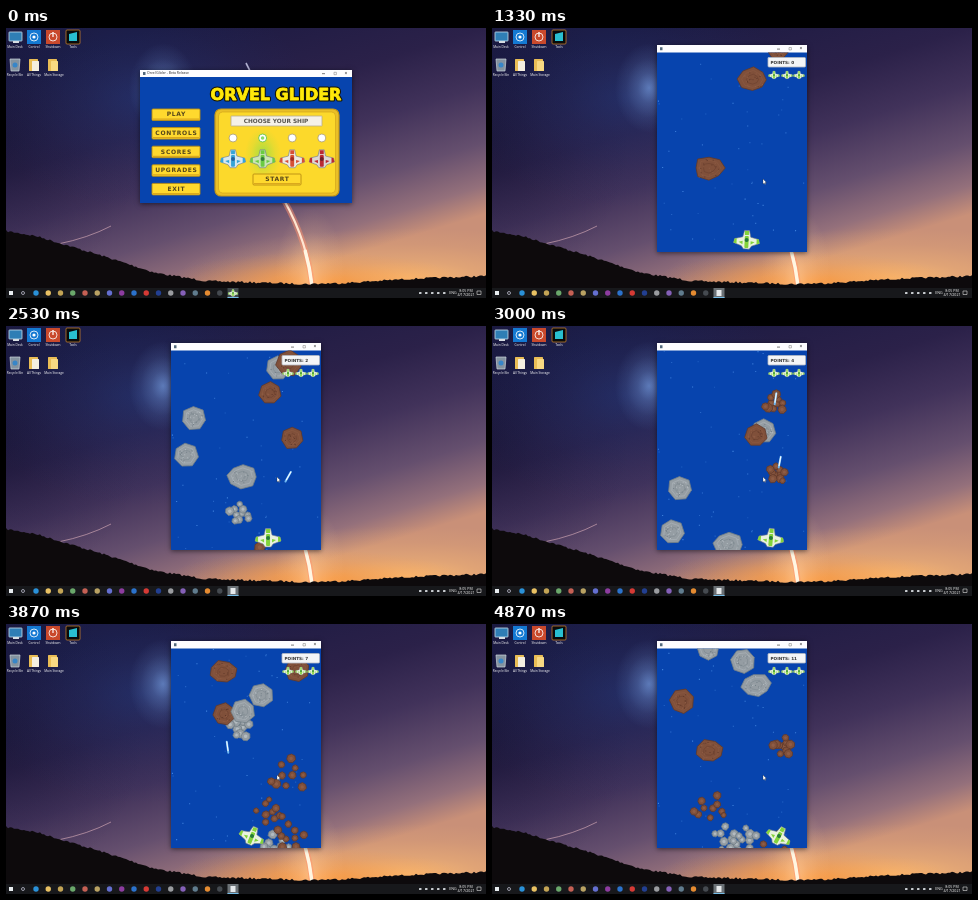
An HTML page with a canvas for the animation above (4.94 s loop, 480 by 270 pixels).

```html
<!DOCTYPE html>
<html lang="en">
<head>
<meta charset="utf-8">
<title>Space shooter on a desktop</title>
<style>
html, body { margin: 0; width: 100%; height: 100%; overflow: hidden; background: #000; }
canvas { display: block; width: 480px; height: 270px; }
</style>
</head>
<body>
<canvas id="stage" width="480" height="270"></canvas>
<script>
const canvas = document.getElementById('stage');
let c = canvas.getContext('2d');
const LOOP = 4940, GAME_START = 600, TAU = Math.PI * 2;
const WIDE = '"DejaVu Sans", sans-serif', SANS = '"Open Sans", sans-serif';

function random(seed) {
  return () => {
    seed = (seed * 16807) % 2147483647;
    return seed / 2147483647;
  };
}

function rect(x, y, w, h, fill, radius = 0, stroke, line = 1) {
  c.beginPath();
  c.roundRect(x, y, w, h, radius);
  c.fillStyle = fill;
  c.fill();
  if (stroke) { c.strokeStyle = stroke; c.lineWidth = line; c.stroke(); }
}

function disc(x, y, r, fill, stroke) {
  c.beginPath();
  c.arc(x, y, r, 0, TAU);
  c.fillStyle = fill;
  c.fill();
  if (stroke) { c.strokeStyle = stroke; c.lineWidth = 0.8; c.stroke(); }
}

function poly(points, fill, stroke, line = 0.7) {
  c.beginPath();
  points.forEach(([x, y]) => c.lineTo(x, y));
  c.closePath();
  if (fill) { c.fillStyle = fill; c.fill(); }
  if (stroke) { c.strokeStyle = stroke; c.lineWidth = line; c.stroke(); }
}

function text(s, x, y, font, fill, align = 'center', spacing = 0) {
  c.font = font;
  c.textAlign = align;
  c.textBaseline = 'middle';
  c.letterSpacing = spacing + 'px';
  c.fillStyle = fill;
  c.fillText(s, x, y);
  c.letterSpacing = '0px';
}

function at(x, y, angle, draw) {
  c.save();
  c.translate(x, y);
  c.rotate(angle);
  draw();
  c.restore();
}

// Desktop

function glow(x, y, rx, ry, color, alpha) {
  c.save();
  c.translate(x, y);
  c.scale(rx, ry);
  const g = c.createRadialGradient(0, 0, 0, 0, 0, 1);
  [1, 0.5, 0.18, 0].forEach((a, i) => g.addColorStop(i / 3, `rgba(${color},${a * alpha})`));
  c.fillStyle = g;
  c.fillRect(-1, -1, 2, 2);
  c.restore();
}

function curve(x0, y0, cx, cy, x1, y1, color, width) {
  c.beginPath();
  c.moveTo(x0, y0);
  c.quadraticCurveTo(cx, cy, x1, y1);
  c.strokeStyle = color;
  c.lineWidth = width;
  c.stroke();
}

function drawSky() {
  // Tilted, because the right side of the sky is the lighter one.
  const sky = c.createLinearGradient(150, 0, 230, 262);
  [[0, '#1b1a42'], [0.35, '#2b2149'], [0.55, '#41325a'], [0.75, '#654f6e'],
   [0.9, '#94707b'], [1, '#c99078']].forEach(s => sky.addColorStop(...s));
  rect(0, 0, 480, 270, sky);
  glow(0, 110, 140, 150, '20,18,48', 0.5);
  glow(135, 70, 170, 110, '35,55,120', 0.6);
  glow(157, 60, 34, 45, '130,175,245', 0.6);
  glow(400, 250, 230, 50, '255,190,115', 0.85);
  glow(310, 254, 150, 30, '255,150,50', 0.85);
  glow(304, 250, 35, 70, '255,200,150', 0.7);
  curve(240, 35, 248, 50, 254, 68, 'rgba(225,225,255,.75)', 1.6);
  curve(233, 70, 262, 118, 279, 175, 'rgba(245,235,255,.9)', 1.8);
  curve(278, 172, 302, 215, 306, 258, 'rgba(255,145,110,.5)', 6);
  curve(278, 172, 302, 215, 306, 258, '#ffe6d2', 2.2);
  curve(299, 222, 304, 240, 306, 258, '#fff6e2', 3.4);
  curve(52, 216, 82, 210, 105, 198, 'rgba(225,180,190,.75)', 0.8);

  const ridge = [[0, 203], [30, 208], [60, 217], [100, 229], [150, 245], [200, 253],
                 [300, 256], [340, 255], [400, 251], [480, 248]];
  const rnd = random(7), hill = [[0, 270]];
  for (let i = 0, x = 0; x <= 480; x += 2) {
    while (i < ridge.length - 2 && x > ridge[i + 1][0]) i++;
    const [x0, y0] = ridge[i], [x1, y1] = ridge[i + 1];
    hill.push([x, y0 + (y1 - y0) * (x - x0) / (x1 - x0) + rnd() * 2 - 1]);
  }
  poly([...hill, [480, 270]], '#0d0a0c');
}

function drawIcons() {
  const label = (s, x, y) => text(s, x, y, `3.2px ${SANS}`, '#fff');
  rect(3, 4, 13, 9, '#2f7eb5', 0.5, '#c8deea', 0.8);
  rect(7, 13, 6, 2, '#d6dde2');
  rect(21, 2, 14, 14, '#1479d2');
  disc(28, 9, 4, '#1479d2', '#fff');
  disc(28, 9, 1.6, '#fff');
  rect(40, 2, 14, 14, '#c9492c');
  disc(47, 9, 4, '#c9492c', '#fff');
  rect(46.4, 4, 1.2, 5, '#fff');
  rect(60, 2, 14, 14, '#080a0c', 1, '#d88a2c', 0.7);
  poly([[63, 6], [71, 4], [71, 13], [63, 13]], '#29bfd0');
  poly([[4, 31], [14, 31], [13, 43], [5, 43]], '#8493a0', '#ccd5dc');
  disc(9, 37, 2.5, '#3786c8');
  for (const x of [23, 42]) {
    rect(x, 31, 9, 12, '#e9bd55', 0.5);
    rect(x + 3, 33, 7, 10, x < 30 ? '#f4efe0' : '#f8d982', 0.5);
  }
  label('Main Desk', 9, 19.5);
  label('Control', 28, 19.5);
  label('Shutdown', 47, 19.5);
  label('Tools', 67, 19.5);
  label('Recycle Bin', 9, 47);
  label('All Things', 28, 47);
  label('Main Storage', 48, 47);
}

function drawTaskbar() {
  rect(0, 260, 480, 10, '#17181b');
  rect(3, 263, 4, 4, '#e8edf0');
  disc(17, 265, 1.5, '#17181b', '#bbc');
  const colors = ['#2a91d8', '#e9c163', '#c3a455', '#6aa86b', '#c56054', '#b9a263', '#646fd0',
    '#8d3ca0', '#2b72cc', '#d63a35', '#223f91', '#9a9ca0', '#8560b8', '#607c8e', '#e58b31', '#454a50'];
  colors.forEach((color, i) => disc(30 + i * 12.25, 265, 2.7, color));
  [414, 420, 426, 432, 438].forEach(x => rect(x - 1, 264, 2.5, 2, '#c8ccd0', 0.5));
  text('ENG', 447, 265, `3.6px ${SANS}`, '#fff');
  text('8:05 PM', 460, 262.7, `3.6px ${SANS}`, '#fff');
  text('4/17/2021', 460, 267.2, `3.6px ${SANS}`, '#fff');
  rect(471, 263, 4, 3.5, '#17181b', 0, '#ddd', 0.6);
}

function makeDesktop() {
  const layer = document.createElement('canvas'), screen = c;
  layer.width = 480;
  layer.height = 270;
  c = layer.getContext('2d');
  drawSky();
  drawIcons();
  drawTaskbar();
  c = screen;
  return layer;
}

function drawWindow(x, y, w, h, bar, title) {
  c.save();
  c.shadowColor = 'rgba(0,0,0,.55)';
  c.shadowBlur = 5;
  c.shadowOffsetY = 1;
  rect(x, y, w, h, '#0744ae');
  c.restore();
  rect(x, y, w, bar, '#fdfdff');
  const mid = y + bar / 2, right = x + w;
  rect(x + 3, mid - 1.5, 2.5, 3, '#52697c');
  text(title, x + 7, mid, `3.4px ${SANS}`, '#222', 'left');
  rect(right - 30, mid, 3, 0.6, '#222');
  rect(right - 18, mid - 1.2, 2.4, 2.4, '#fff', 0, '#777', 0.5);
  text('×', right - 6, mid, `5px ${SANS}`, '#222');
}

// Ships and menu

function drawShip(x, y, angle, scale, wing, trim, core) {
  at(x, y, angle, () => {
    c.scale(scale, scale);
    poly([[-13, 3], [-12, -1], [-4, -3], [-2.5, -9.5], [2.5, -9.5], [4, -3], [12, -1], [13, 3],
          [5, 6], [3, 9], [-3, 9], [-5, 6]], wing, '#68758a', 0.6);
    for (const side of [-1, 1]) {
      poly([[side * 13, 3], [side * 12, -1], [side * 10, -1.4], [side * 10, 4]], trim);
      poly([[side * 8, 2], [side * 4, 1], [side * 4, 4.5]], trim);
    }
    rect(-2, -9, 4, 4, trim);
    rect(-2, -4, 4, 12, trim, 1);
    disc(0, 0, 2, core);
  });
}

const greenShip = (x, y, angle, scale) =>
  drawShip(x, y, angle, scale, '#e9f2df', '#83d33b', '#267a3a');

function drawButton(label, x, y, w, h) {
  rect(x, y, w, h, '#ffd92e', 1, '#b98d13', 0.9);
  rect(x + 1, y + h - 2, w - 2, 1.3, '#dba91c');
  text(label, x + w / 2 + 0.4, y + h / 2, `bold 6px ${WIDE}`, '#54451a', 'center', 0.7);
}

function drawMenu() {
  drawWindow(134, 42, 212, 133, 7, 'Orvel Glider - Beta Release');
  c.font = `900 16px ${WIDE}`;
  c.textAlign = 'center';
  c.textBaseline = 'middle';
  c.lineJoin = 'round';
  c.lineWidth = 3;
  c.strokeStyle = '#171400';
  c.strokeText('ORVEL GLIDER', 270, 67.5);
  c.fillStyle = c.strokeStyle = '#ffe90a';
  c.lineWidth = 0.8;
  c.fillText('ORVEL GLIDER', 270, 67.5);
  c.strokeText('ORVEL GLIDER', 270, 67.5);

  ['PLAY', 'CONTROLS', 'SCORES', 'UPGRADES', 'EXIT']
    .forEach((label, i) => drawButton(label, 146, 81 + i * 18.6, 48, 11.5));

  rect(209, 81, 124, 87, '#e9bf27', 6, '#c59718', 1.2);
  rect(212.5, 84, 117, 81, '#fcd92b', 4, '#d3a51c', 0.7);
  rect(225, 88, 91, 10, '#f5f1e8', 0.5, '#b8ad8c', 0.8);
  text('CHOOSE YOUR SHIP', 270, 93, `bold 5.8px ${WIDE}`, '#55524c');

  glow(257, 127, 18, 27, '125,225,75', 0.85);
  [['#d9e8f0', '#36a4d8', '#235f9d'], ['#cbe5b5', '#6acb42', '#347b3c'],
   ['#eee9e2', '#d65035', '#a02b24'], ['#ddd8d5', '#b92a32', '#691f2b']]
    .forEach((colors, i) => {
      const x = 227 + i * 29.6;
      disc(x, 110, 4, '#fff', i === 1 ? '#55bd3c' : '#a99b6f');
      if (i === 1) disc(x, 110, 1.8, '#87dc69');
      drawShip(x, 131, 0, 0.97, ...colors);
    });
  drawButton('START', 247, 146, 48, 11);
}

// Game

const shipKeys = [ // time, x, tilt in degrees
  [600, 245, 0], [900, 245, 0], [1570, 260, 4], [1870, 268, 22], [2270, 242, -3],
  [2530, 262, 0], [2830, 278, 0], [3000, 279, 5], [3598, 233, -5], [3870, 246, 22], [4870, 287, 28]];

function shipAt(t) {
  let i = 0;
  while (i < shipKeys.length - 2 && t > shipKeys[i + 1][0]) i++;
  const [t0, x0, a0] = shipKeys[i], [t1, x1, a1] = shipKeys[i + 1];
  const k = Math.max(0, Math.min(1, (t - t0) / (t1 - t0)));
  return { x: x0 + (x1 - x0) * k, angle: (a0 + (a1 - a0) * k) * Math.PI / 180 };
}

// kind (brown/grey), time, x, y at that time, px per second, radius, hit time
const meteors = [
  ['b', 730, 217, 39, 168, 15],
  ['b', 1870, 261, 135, 155, 15, 1810],
  ['g', 1870, 236, 55, 144, 15],
  ['g', 1870, 234, 83, 158, 12, 2400],
  ['g', 2530, 180, 129, 163, 12],
  ['g', 2530, 188, 92, 149, 12],
  ['g', 2530, 272, 42, 134, 12, 3350],
  ['b', 2530, 286, 112, 76, 11, 2970],
  ['b', 2530, 264, 67, 90, 11, 3250],
  ['b', 2530, 283, 37, 85, 13, 2990],
  ['g', 3870, 235, 103, 147, 13, 3780],
  ['b', 3870, 218, 90, 94, 11, 3955],
  ['g', 3870, 237, 87, 128, 12, 4250],
  ['g', 3870, 255, 71, 145, 12, 4400],
  ['b', 3870, 217, 48, 79, 15],
  ['b', 3870, 291, 46, 76, 12, 4800],
  ['b', 4870, 190, 77, 110, 12],
  ['g', 4870, 251, 37, 140, 12],
  ['g', 4870, 264, 61, 140, 15],
  ['g', 4870, 216, 25, 145, 11],
].map(([kind, time, x, y, speed, r, hit = Infinity], i) => ({
  x, r, hit, seed: 91 + i * 677,
  colors: kind === 'b' ? ['#80503a', '#61392a', '#8e5c45'] : ['#959da3', '#737f87', '#b3bbc0'],
  yAt: t => y + (t - time) * speed / 1000,
}));

function drawRock(x, y, r, colors, seed) {
  const rnd = random(seed), big = r > 14, sides = big ? 8 : 7, turn = rnd() * TAU;
  for (let i = 0; i < 4; i++) rnd();
  const shape = Array.from({ length: sides }, (_, i) => {
    const a = turn + i * TAU / sides, d = r * (big ? 0.85 + rnd() * 0.25 : 0.96 + rnd() * 0.1);
    return [Math.cos(a) * d, Math.sin(a) * d * (big ? 0.78 : 1)];
  });
  const ring = k => shape.map(([px, py]) => [px * k, py * k]);
  at(x, y, 0, () => {
    poly(shape, colors[0], colors[1], 0.8);
    if (r < 7) return poly(ring(0.4), colors[2]);
    poly(ring(0.72), null, colors[2], 0.5);
    poly(ring(0.42), null, colors[1], 0.4);
    for (let i = 0; i < 22; i++) {
      const a = rnd() * TAU, d = Math.sqrt(rnd()) * r * 0.75;
      rect(Math.cos(a) * d, Math.sin(a) * d * 0.85, 1, 1, colors[1 + i % 2]);
    }
  });
}

function drawMeteor(m, t) {
  const y = m.yAt(t);
  if (y < -20 || y > 250) return;
  if (t < m.hit) return drawRock(m.x, y, m.r, m.colors, m.seed);
  const age = (t - m.hit) / 1000, rnd = random(m.seed), spread = m.r * (0.8 + age * 0.8);
  for (let i = 0; i < 10; i++) {
    const a = i * 2.4 + rnd(), d = spread * Math.sqrt((i + 0.3) / 10);
    drawRock(m.x + Math.cos(a) * d, y + Math.sin(a) * d, m.r * (0.24 + rnd() * 0.15), m.colors, m.seed + i);
  }
}

const BULLET_SPEED = 0.3;

function drawBullet(x, y, angle) {
  at(x, y, angle, () => {
    rect(-1, -6.5, 2, 13, '#6fb8f2', 1);
    rect(-0.6, -6, 1.2, 10, '#f2faff', 0.5);
  });
}

function drawAimedBullet(m, t) {
  const y = m.yAt(m.hit), start = m.hit - (205 - y) / BULLET_SPEED;
  if (t < start || t > m.hit + 35) return;
  const x0 = shipAt(start).x, k = (t - start) / (m.hit - start);
  drawBullet(x0 + (m.x - x0) * k, 205 + (y - 205) * k, Math.atan2(m.x - x0, 205 - y));
}

function drawStrayBullet(time, x, y, degrees, t) {
  const a = degrees * Math.PI / 180, d = (t - time) * BULLET_SPEED;
  const by = y - d * Math.cos(a);
  if (by < 203) drawBullet(x + d * Math.sin(a), by, a);
}

const starRandom = random(4321);
const stars = Array.from({ length: 48 }, () => [starRandom() * 150, starRandom() * 200, starRandom()]);

function drawGame(t) {
  c.save();
  c.globalAlpha = Math.min(1, 0.3 + (t - GAME_START) / 240);
  drawWindow(165, 17, 150, 207, 7.5, '');
  c.beginPath();
  c.rect(165, 24.5, 150, 199.5);
  c.clip();
  for (const [x, y, light] of stars) {
    rect(165 + x, 24 + (y + t * 0.03) % 200, 1.1, 1.1, `rgba(105,175,255,${0.2 + light * 0.4})`);
  }
  c.globalAlpha = 1;
  meteors.forEach(m => drawMeteor(m, t));
  meteors.filter(m => m.hit < LOOP).forEach(m => drawAimedBullet(m, t));
  drawStrayBullet(1870, 271, 195, 24, t);
  drawStrayBullet(2530, 282, 151, 29, t);
  const ship = shipAt(t);
  greenShip(ship.x, 212, ship.angle, 1);
  rect(276, 29.5, 37.5, 9.5, '#f4f5f7', 1, '#b4b9c3', 0.8);
  const points = meteors.filter(m => m.hit <= t).length;
  text('POINTS: ' + points, 278.5, 34.5, `bold 4.2px ${WIDE}`, '#333', 'left');
  [282, 295, 307].forEach(x => greenShip(x, 47, 0, 0.43));
  poly([[271, 151], [271, 156], [272.2, 155], [273, 156.5], [273.7, 156], [273, 154.6], [274.5, 154.5]],
    '#fff', '#222', 0.3);
  c.restore();
}

function drawActiveTask(t) {
  const menu = t < GAME_START, x = !menu && t < 930 ? 238 : 227;
  rect(x - 5.5, 260, 11, 10, menu ? '#41494d' : '#6a7075');
  rect(x - 5.5, 269, 11, 1, '#75bde8');
  if (menu) greenShip(x, 265, 0, 0.38);
  else rect(x - 2.5, 262, 5, 6, '#e6e9eb');
}

const desktop = makeDesktop();

function frame(now) {
  const t = now % LOOP;
  c.drawImage(desktop, 0, 0);
  drawActiveTask(t);
  if (t < 535) drawMenu();
  else if (t >= GAME_START) drawGame(t);
  requestAnimationFrame(frame);
}
requestAnimationFrame(frame);
</script>
</body>
</html>
```
